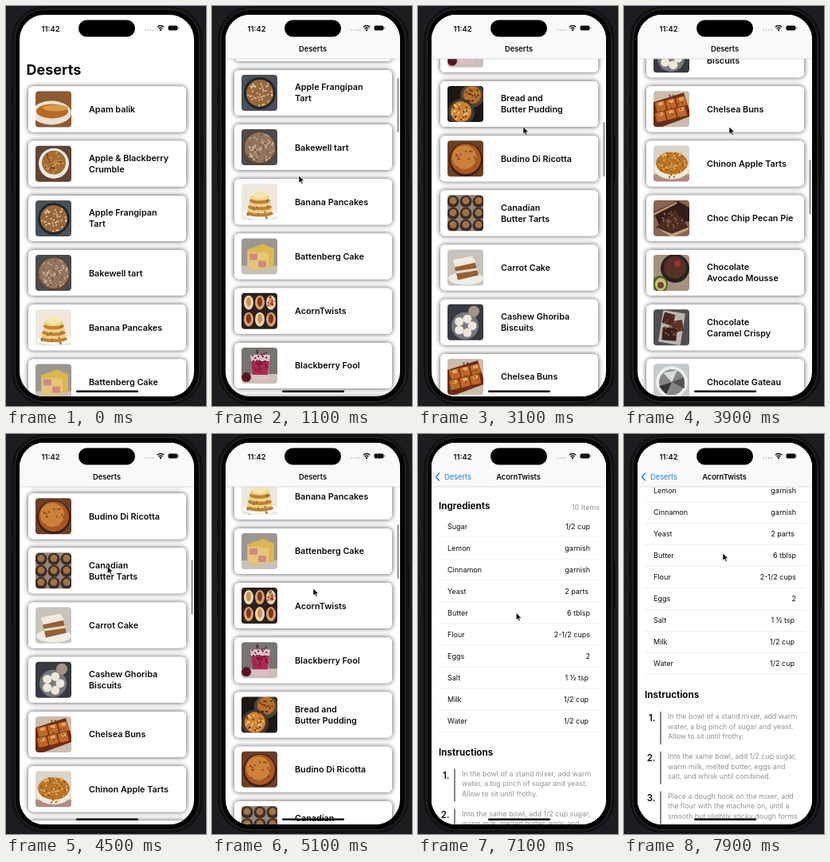
Recreate the animation shown at these times as an HTML page. Size 251 by 500 pixels, loop 8000 ms.

```html
<!DOCTYPE html>
<html lang="en">
<head>
<meta charset="utf-8">
<title>Dessert list</title>
<style>
  html, body { margin: 0; width: 100%; height: 100%; overflow: hidden; background: #1d1d21; }
  svg { display: block; width: 100vw; height: 100vh; }
  text { font-family: Inter, "Noto Sans", sans-serif; font-size: 9px; fill: #0c0c0e; }
  .large { font-size: 18px; font-weight: 700; }
  .small { font-size: 9.3px; font-weight: 600; text-anchor: middle; }
  .dish { font-size: 10.8px; font-weight: 630; }
  .head { font-size: 11.6px; font-weight: 700; }
  .num { font-size: 11.5px; font-weight: 600; text-anchor: end; }
  .clock { font-size: 9.4px; font-weight: 600; }
  .end { text-anchor: end; }
  .grey { fill: #8e8e93; }
  .step { font-size: 8.9px; fill: #929296; }
  .back { font-size: 9.3px; fill: #2480dc; }
</style>
</head>
<body>
<svg viewBox="0 0 251 500" preserveAspectRatio="none">
  <defs>
    <clipPath id="screen"><rect x="17" y="11" width="219" height="477" rx="31"/></clipPath>
    <clipPath id="thumb"><rect width="45" height="45" rx="4"/></clipPath>
    <filter id="shadow" x="-10%" y="-25%" width="120%" height="150%">
      <feDropShadow dx="0" dy="0" stdDeviation="3" flood-color="#000" flood-opacity=".72"/>
    </filter>
    <filter id="soft" x="0" y="0" width="100%" height="100%"><feGaussianBlur stdDeviation=".6"/></filter>
  </defs>
  <g fill="#111114" stroke="#2c2c31" stroke-width=".6">
    <rect x="5.500" y="106" width="4" height="18" rx="1"/>
    <rect x="5.500" y="146" width="4" height="36" rx="1"/>
    <rect x="5.500" y="194" width="4" height="36" rx="1"/>
    <rect x="244.500" y="160" width="4" height="58" rx="1"/>
  </g>
  <rect x="8" y="1" width="238" height="497" rx="41" fill="#161618" stroke="#08080a"/>
  <rect x="11.500" y="4.500" width="231" height="490" rx="37" fill="#030304" stroke="#2b2b2e"/>
  <g clip-path="url(#screen)">
    <rect x="17" y="11" width="219" height="478" fill="#fff"/>
    <g id="listView">
      <g id="list"><text class="large" x="25.500" y="86">Deserts</text></g>
      <rect id="thumbBar" x="232.500" width="2" height="68" rx="1" fill="#8b8b8e"/>
    </g>
    <rect id="dim" x="17" y="11" width="219" height="478" opacity="0"/>
    <g id="listBar">
      <rect x="17" y="11" width="219" height="55" fill="#f9f9f9"/>
      <path d="M17 66H236" stroke="#c9c9cc" stroke-width=".6"/>
    </g>
    <g id="detailView">
      <rect x="17" y="11" width="219" height="478" fill="#fff"/>
      <g id="detail">
        <text class="head" x="26" y="116">Ingredients</text>
        <text id="count" class="end grey" x="228" y="117.500"></text>
        <text id="emptyHead" class="head" x="26" y="154">Instructions</text>
        <g id="recipe"><text class="large" x="25.500" y="86">AcornTwists</text></g>
      </g>
    </g>
    <g id="detailBar">
      <rect id="detailFill" x="17" y="11" width="219" height="55"/>
      <path id="detailLine" d="M17 66H236" stroke="#c9c9cc" stroke-width=".6"/>
      <path d="M26.500 49L22.500 53.500L26.500 58" fill="none" stroke="#2480dc" stroke-width="1.4" stroke-linecap="round" stroke-linejoin="round"/>
      <text id="back" class="back" y="57">Deserts</text>
      <text id="detailTitle" class="small" x="126" y="57">AcornTwists</text>
    </g>
    <text id="listTitle" class="small" x="126.500" y="57">Deserts</text>
    <text class="clock" x="44.500" y="31.500">11:42</text>
    <path d="M174.500 30H186" stroke="#aaa" stroke-width="1.300" stroke-dasharray="1.300 2"/>
    <path d="M189.700 26.300Q194 22.700 198.300 26.300M191.500 28.200Q194 26.200 196.500 28.200" fill="none" stroke="#111" stroke-width="1.400"/>
    <circle cx="194" cy="30" r="1.200"/>
    <rect x="203.500" y="24.500" width="12" height="6" rx="2" fill="#111"/>
    <path d="M216.800 26.500V28.500" stroke="#777"/>
  </g>
  <rect x="91" y="17.500" width="71" height="21" rx="10.500"/>
  <rect x="88" y="480.500" width="78" height="2.500" rx="1.250"/>
  <path id="cursor" d="M0 0V9.200L2.200 7.200L3.700 10.500L5.200 9.800L3.700 6.600H6.600Z" fill="#000" stroke="#fff" stroke-width=".6"/>
</svg>
<script>
const el = id => document.getElementById(id);
const add = (id, markup) => el(id).insertAdjacentHTML('beforeend', markup);
const clamp = v => Math.max(0, Math.min(1, v));
const PITCH = 68.2;

// Thumbnail building blocks on a 45 x 45 tile
const oval = (x, y, rx, ry, fill) => `<ellipse cx="${x}" cy="${y}" rx="${rx}" ry="${ry}" fill="${fill}"/>`;
const disc = (x, y, r, fill) => oval(x, y, r, r, fill);
const box = (x, y, w, h, fill, turn = 0) =>
  `<rect x="${x}" y="${y}" width="${w}" height="${h}" rx="1" fill="${fill}" transform="rotate(${turn} ${x + w / 2} ${y + h / 2})"/>`;
const shape = (d, fill) => `<path d="${d}" fill="${fill}"/>`;
const back = fill => box(-2, -2, 49, 49, fill);
const repeat = (n, draw) => Array.from({ length: n }, (_, i) => draw(i)).join('');
function crumbs(x, y, r, n, fill) {
  let seed = n * 97 + x;
  const random = () => (seed = (seed * 16807) % 2147483647) / 2147483647;
  return repeat(n, () => {
    const angle = random() * 6.283, reach = Math.sqrt(random()) * r;
    return disc((x + Math.cos(angle) * reach).toFixed(1), (y + Math.sin(angle) * reach).toFixed(1), 1.1, fill);
  });
}
const grid = (cols, rows, draw) => repeat(cols * rows, i => draw(i % cols, Math.floor(i / cols)));

const dishes = [
  ['Apam balik', back('#8d5a31') + oval(20, 27, 25, 15, '#e9e1d4') + oval(21, 25, 20, 9, '#b76a20') + oval(25, 21, 16, 4, '#d69b4c')],
  ['Apple &amp; Blackberry|Crumble', back('#604436') + disc(23, 22, 19, '#eee9e3') + disc(23, 21, 15, '#a66c30') + crumbs(23, 21, 14, 28, '#d0a164') + crumbs(21, 20, 11, 8, '#552b2c')],
  ['Apple Frangipan|Tart', back('#4a5057') + disc(23, 23, 20, '#20252b') + disc(23, 23, 17, '#98683a') + crumbs(23, 23, 16, 40, '#d8c4a4')],
  ['Bakewell tart', back('#4b4a4c') + disc(23, 24, 21, '#5b4436') + disc(23, 23, 19, '#94745c') + crumbs(23, 23, 18, 50, '#c9b5a2') + crumbs(22, 24, 18, 20, '#6f5140')],
  ['Banana Pancakes', back('#eee8dc') + oval(24, 38, 22, 6, '#fff') + repeat(6, i => oval(23, 37 - i * 4, 17 - i, 4, i % 2 ? '#f0cf86' : '#bd8131')) + oval(23, 14, 9, 5, '#f6e6ae') + crumbs(23, 35, 18, 12, '#8a5a2c')],
  ['Battenberg Cake', back('#9b968f') + box(-2, 34, 49, 13, '#c8c1b7') + shape('M7 14L27 7L41 13V35L14 40L7 34Z', '#dcb84c') + shape('M8 17L34 18V37L14 39L8 34Z', '#e6c57a') + box(10, 19, 10, 8, '#d08a80') + box(21, 28, 10, 8, '#d08a80')],
  ['AcornTwists', back('#2b201f') + grid(3, 2, (x, y) => oval(9 + x * 14, 12 + y * 21, 6, 9, (x + y) % 2 ? '#d7a066' : '#edd6ad') + oval(9 + x * 14, 11 + y * 21, 3, 6, (x + y) % 2 ? '#7a3424' : '#c99257')) + crumbs(36, 10, 7, 12, '#a02c30')],
  ['Blackberry Fool', back('#77736f') + box(-2, 33, 49, 14, '#cdbfb9') + shape('M11 9H36L33 41H15Z', '#dcc0c6') + shape('M12 17H35L33 34H14Z', '#a82c50') + crumbs(24, 24, 9, 18, '#7a1536') + crumbs(23, 12, 10, 18, '#641429') + disc(6, 37, 6, '#591420')],
  ['Bread and|Butter Pudding', back('#1c1714') + disc(31, 12, 15, '#4d4339') + disc(31, 11, 11, '#b8702a') + disc(17, 33, 17, '#403831') + disc(17, 32, 13, '#cc8434') + crumbs(17, 32, 12, 20, '#f0cc7c') + crumbs(17, 31, 12, 12, '#6e2a16') + crumbs(31, 11, 9, 14, '#4f2513')],
  ['Budino Di Ricotta', back('#6b3f26') + disc(23, 24, 21, '#3a1d12') + disc(23, 23, 19, '#a85820') + disc(21, 21, 15, '#cd8038') + crumbs(23, 23, 15, 14, '#83401b')],
  ['Canadian|Butter Tarts', back('#8f857c') + grid(3, 3, (x, y) => disc(7 + x * 16, 8 + y * 15, 7.5, '#3d2d25') + disc(7 + x * 16, 7 + y * 15, 4.5, '#a17345'))],
  ['Carrot Cake', back('#c8c4bd') + oval(23, 36, 22, 8, '#f0ece6') + shape('M8 18L34 14L39 32L13 38Z', '#926036') + shape('M7 13L31 8L36 16L9 22Z', '#f3eadb') + shape('M10 27L37 23L38 26L11 30Z', '#e9d9bf')],
  ['Cashew Ghoriba|Biscuits', back('#373a40') + disc(22, 27, 17, '#777a7d') + disc(33, 9, 7, '#a29388') + repeat(5, i => disc(22 + Math.cos(i * 1.257) * 9, 27 + Math.sin(i * 1.257) * 9, 5.5, '#efe7dc'))],
  ['Chelsea Buns', back('#cbbdae') + shape('M0 14L38 2L45 24V32L10 45H0Z', '#6a2c14') + grid(3, 2, (x, y) => box(3 + x * 13, 13 + y * 13 - x * 3, 12, 12, '#c06628', -14) + box(6 + x * 13, 14 + y * 13 - x * 3, 6, 4, '#e3a65c', -14)) + crumbs(22, 22, 17, 14, '#843a16')],
  ['Chinon Apple Tarts', back('#dad4ca') + box(-2, 36, 49, 11, '#b08b84') + oval(23, 28, 22, 14, '#f1e9db') + oval(23, 22, 20, 14, '#bb7426') + crumbs(23, 21, 17, 40, '#e6b962') + crumbs(23, 23, 17, 18, '#8b4a18')],
  ['Choc Chip Pecan Pie', back('#886454') + shape('M0 15L30 1L45 9V26L8 33Z', '#321d18') + shape('M3 34L27 12L44 34L23 43Z', '#4b2c22') + shape('M3 34L23 42L44 34V37L23 46Z', '#c9a07a') + shape('M0 16L29 2L30 4L1 19Z', '#b98e6c') + crumbs(24, 24, 13, 22, '#94694b')],
  ['Chocolate|Avocado Mousse', back('#a5917f') + disc(27, 17, 18, '#28201e') + disc(27, 16, 14, '#553126') + disc(30, 11, 4, '#9e3032') + oval(8, 37, 10, 11, '#4c6526') + oval(9, 37, 7, 8, '#c3c176') + disc(9, 38, 4, '#704227')],
  ['Chocolate|Caramel Crispy', back('#4f4f52') + box(9, 3, 28, 40, '#bab4ae', 9) + box(12, 5, 14, 14, '#4a281e', 15) + box(23, 14, 14, 14, '#5c3226', -9) + box(11, 23, 18, 16, '#39211b', 5) + crumbs(23, 23, 14, 22, '#805441')],
  ['Chocolate Gateau', back('#c4cbce') + disc(23, 23, 20, '#eef0ef') + disc(23, 23, 16, '#858684') + shape('M23 23L12 11L30 8Z', '#d8dcdb') + shape('M23 23L7 28L16 38Z', '#383333') + shape('M23 23L38 17L39 31Z', '#545150')],
];

const lines = (text, x, y, gap, cls) => text.split('|').map((line, i) =>
  `<text class="${cls}" x="${x}" y="${y + i * gap}">${line}</text>`).join('');

dishes.forEach(([name, art], i) => add('list', `<g transform="translate(0 ${100.5 + i * PITCH})">
  <rect x="28" width="198" height="57" rx="6" fill="#fff" filter="url(#shadow)"/>
  <g transform="translate(37 6)" clip-path="url(#thumb)"><g filter="url(#soft)">${art}</g></g>
  ${lines(name, 104, name.includes('|') ? 25.5 : 32.5, 14, 'dish')}</g>`));

const ingredients = [
  ['Sugar', '1/2 cup'], ['Lemon', 'garnish'], ['Cinnamon', 'garnish'], ['Yeast', '2 parts', 2],
  ['Butter', '6 tblsp'], ['Flour', '2-1/2 cups'], ['Eggs', '2'], ['Salt', '1 ½ tsp', 2],
  ['Milk', '1/2 cup', 2], ['Water', '1/2 cup', 2],
];
const steps = [
  'In the bowl of a stand mixer, add warm|water, a big pinch of sugar and yeast.|Allow to sit until frothy.',
  'Into the same bowl, add 1/2 cup sugar,|warm milk, melted butter, eggs and|salt, and whisk until combined.',
  'Place a dough hook on the mixer, add|the flour with the machine on, until a|smooth but slightly sticky dough forms.',
];
ingredients.forEach(([name, amount, inset = 0], i) => {
  const y = 138 + i * 27;
  add('recipe', `<text x="37" y="${y + 3.2}">${name}</text>
    <text class="end" x="${216 - inset}" y="${y + 3.2}">${amount}</text>
    <path d="M26 ${y + 13.5}H228" stroke="#e4e4e7" stroke-width=".6"/>`);
});
add('recipe', '<text class="head" x="26" y="424">Instructions</text>');
steps.forEach((step, i) => {
  const y = 447 + i * 49.8;
  add('recipe', `<text class="num" x="39.5" y="${y + 6}">${i + 1}.</text>
    <rect x="45" y="${y - 6}" width="2" height="41" fill="#88888b"/>${lines(step, 55, y + 3.2, 12.5, 'step')}`);
});

// Flicks: start, duration, from, to
const flicks = [[700, 1400, 0, 247], [2500, 800, 247, 557], [3300, 800, 557, 892], [4300, 1175, 892, 304.5]];
const pointer = [
  [500, 150, 505], [700, 128, 320], [1100, 109, 212], [2100, 109, 212], [2400, 132, 262], [2700, 132, 151],
  [3100, 132, 151], [3300, 132, 250], [3500, 132, 151], [4100, 132, 151], [4300, 128, 110], [4600, 127, 193],
  [5100, 127, 193], [5600, 123, 247], [6750, 123, 247],
];

function listScroll(t) {
  const [start, span, from, to] = flicks.findLast(f => t >= f[0]) || flicks[0];
  return from + (to - from) * (1 - (1 - clamp((t - start) / span)) ** 3);
}
function pointerAt(t) {
  const next = pointer.findIndex(k => k[0] > t);
  if (next < 0) return pointer.at(-1).slice(1);
  if (next === 0) return pointer[0].slice(1);
  const [a, b] = [pointer[next - 1], pointer[next]];
  const p = (t - a[0]) / (b[0] - a[0]);
  return [1, 2].map(i => a[i] + (b[i] - a[i]) * p);
}
function pushed(t) {
  const u = Math.max(0, t - 5800) * 0.0158;
  return 1 - (1 + u) * Math.exp(-u);
}
const move = (id, x, y) => el(id).setAttribute('transform', `translate(${x.toFixed(2)} ${y.toFixed(2)})`);
const fade = (id, v) => el(id).setAttribute('opacity', v);

function render(t) {
  const scroll = listScroll(t), push = pushed(t), loaded = t >= 6400;
  const drag = clamp((t - 6750) / 1100), pull = drag * drag * (3 - 2 * drag);
  const scrolled = pull > 0.1;

  move('list', 0, -scroll);
  move('listView', -66 * push, 0);
  move('thumbBar', 0, 68 + 0.14 * scroll);
  fade('thumbBar', clamp(scroll / 20) * clamp((5800 - t) / 300));
  fade('dim', 0.1 * push);
  fade('listBar', clamp(scroll / 20));
  fade('listTitle', clamp((scroll - 15) / 15) * clamp(1 - push * 1.3));

  move('detailView', 220 * (1 - push), 0);
  move('detail', 0, -94 * pull);
  fade('recipe', loaded ? 1 : 0);
  fade('emptyHead', loaded ? 0 : 1);
  el('count').textContent = (loaded ? ingredients.length : 0) + ' Items';
  fade('detailBar', push);
  el('detailFill').setAttribute('fill', scrolled ? '#f9f9f9' : '#fff');
  fade('detailLine', scrolled ? 1 : 0);
  fade('detailTitle', scrolled ? 1 : 0);
  el('back').setAttribute('x', 33 + 76 * (1 - push));

  const [x, y] = pointerAt(t);
  move('cursor', x + pull, y - 98 * pull);
  fade('cursor', t < 600 ? 0 : 1);
}

// The picture advances five times a second
function frame(now) {
  const t = now % 8000;
  render(t < 100 ? 0 : 100 + 200 * Math.floor((t - 100) / 200));
  requestAnimationFrame(frame);
}
render(0);
requestAnimationFrame(frame);
</script>
</body>
</html>
```
